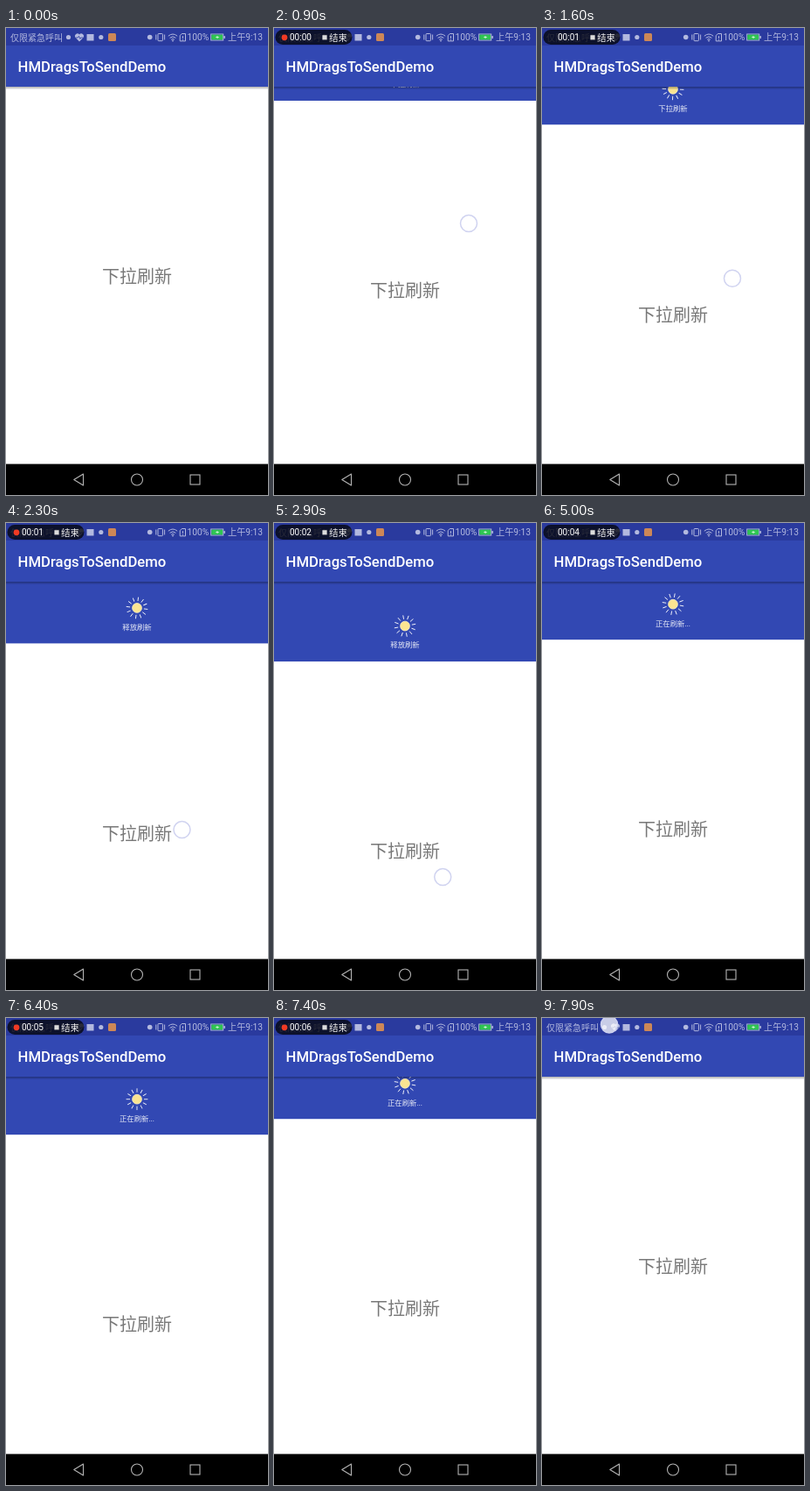
These frames come from a looping animation (300x533 px, 8 s). An HTML page:

```html
<!DOCTYPE html>
<html lang="zh">
<head>
<meta charset="utf-8">
<title>Pull to refresh</title>
<style>
  html, body { margin: 0; width: 100%; height: 100%; overflow: hidden; background: #fff; }
  svg { display: block; width: 100vw; height: 100vh; }
  text { font-family: Roboto, "Noto Sans CJK SC", "Noto Sans CJK", sans-serif; }
  .mid { text-anchor: middle; }
  .line { fill: none; stroke: #b3b9df; stroke-width: 1; }
</style>
</head>
<body>
<svg viewBox="0 0 300 533" preserveAspectRatio="none">
  <defs>
    <linearGradient id="shade" x1="0" y1="0" x2="0" y2="1">
      <stop offset="0" stop-color="#000" stop-opacity=".32"/>
      <stop offset="1" stop-color="#000" stop-opacity="0"/>
    </linearGradient>
  </defs>

  <g id="page">
    <rect y="-60" width="300" height="127" fill="#3248b3"/>
    <rect y="67" width="300" height="470" fill="#fff"/>
    <g transform="translate(150 26.3)">
      <g id="rays" stroke="#f4f5fb" stroke-width=".9" stroke-linecap="round"></g>
      <circle r="5.4" fill="#fbe491" stroke="#fbf0c4" stroke-width=".8"/>
    </g>
    <text id="label" class="mid" x="150" y="51.2" font-size="8.35" fill="#e6e9f6"></text>
    <text class="mid" x="150" y="291" font-size="20" fill="#787878">下拉刷新</text>
  </g>

  <rect y="67" width="300" height="3.5" fill="url(#shade)"/>
  <rect y="20" width="300" height="47" fill="#3248b3"/>
  <rect width="300" height="20" fill="#2a3a9e"/>
  <text x="13.6" y="50" font-size="16.7" font-weight="500" fill="#fff">HMDragsToSendDemo</text>

  <!-- status bar -->
  <g fill="#b3b9df">
    <text x="5" y="14.8" font-size="10">仅限紧急呼叫</text>
    <circle cx="71.5" cy="10.5" r="2.6"/>
    <path d="M84 15.5L79.6 11A2.6 2.6 0 0 1 84 7.6A2.6 2.6 0 0 1 88.4 11Z"/>
    <path d="M80 11h2.3l1.2-1.7 1.4 3 1-1.3h2.1" fill="none" stroke="#2a3a9e" stroke-width=".8"/>
    <rect x="92.5" y="7" width="8" height="7.5"/>
    <circle cx="108.8" cy="10.5" r="2.6"/>
    <rect x="117" y="6" width="9" height="9" rx="1.5" fill="#cd8757"/>
    <circle cx="164.7" cy="10.5" r="2.8"/>
    <rect class="line" x="174" y="6.5" width="5.4" height="8.2" rx=".8"/>
    <path class="line" d="M171.8 7.5v6M181.6 7.5v6"/>
    <path class="line" d="M185.8 9.2Q191 4.8 196.2 9.2M187.6 11.3Q191 8.5 194.4 11.3M189.2 13.2Q191 11.8 192.8 13.2"/>
    <circle cx="191" cy="14.6" r=".9"/>
    <path class="line" d="M201.3 6.5h4.2v8.4h-6.3v-6.2zM202.4 9v3M202.4 13v1"/>
    <text x="207.4" y="13.9" font-size="10.3">100%</text>
    <rect class="line" x="234.7" y="7" width="14" height="7"/>
    <rect x="235.3" y="7.6" width="12.8" height="5.8" fill="#2fc552"/>
    <path d="M239.6 10.8l2.8-1.7v1.1h2l-2.8 1.9v-1.3z" fill="#e9fbee"/>
    <rect x="249.3" y="9" width="1.6" height="3"/>
    <text x="254" y="14.4" font-size="10.2">上午9:13</text>
  </g>

  <!-- recorder pill -->
  <g id="pill">
    <rect x="1.5" y="2" width="88" height="17" rx="8.5" fill="#05070f" fill-opacity=".8"/>
    <circle id="dot" cx="12" cy="10.8" r="3.4" fill="#f03a24"/>
    <text id="clock" x="18" y="14.4" font-size="10" fill="#fff"></text>
    <rect x="55.4" y="8.2" width="5.2" height="5.2" fill="#dcdcdc"/>
    <text x="63.3" y="14.7" font-size="10.2" fill="#f2f2f2">结束</text>
  </g>

  <rect y="497.6" width="300" height="35.4" fill="#000"/>
  <g fill="none" stroke="#b4b4b4" stroke-width="1.1">
    <path d="M88.5 509v13L77.8 515.5z" stroke-linejoin="round"/>
    <circle cx="150" cy="515.5" r="6.5"/>
    <rect x="211" y="510" width="11" height="11"/>
  </g>

  <circle id="touch" r="9.5" fill="#fff" stroke="#d0d3f0" stroke-width="1.5"/>
</svg>
<script>
const LOOP = 8000, REST = 66.4;
const RELEASE = 3800, SETTLED = 4150, CLOSE = 7350, CLOSED = 7700;
const $ = id => document.getElementById(id);
const [page, rays, label, pill, dot, clock, touch] =
  ['page', 'rays', 'label', 'pill', 'dot', 'clock', 'touch'].map($);

for (let i = 0; i < 12; i++) {
  const ray = document.createElementNS('http://www.w3.org/2000/svg', 'path');
  ray.setAttribute('d', 'M0 -8.3V-12');
  ray.setAttribute('transform', `rotate(${i * 30})`);
  rays.append(ray);
}

// time, pull distance, finger x, finger y
const drag = [
  [300, 0, 226, 178],
  [500, 0, 225, 186],
  [900, 16, 223, 223],
  [1600, 43.5, 218, 285.7],
  [1800, 50.5, 213, 303],
  [2300, 70.6, 201.5, 350],
  [2700, 86.5, 195, 391],
  [3100, 96, 191.5, 417],
  [3500, 99, 190.5, 425],
  [RELEASE, 99, 190.5, 425]
];

function sample(t, col) {
  if (t <= drag[0][0]) return drag[0][col];
  const i = drag.findIndex(row => row[0] >= t);
  if (i < 0) return drag[drag.length - 1][col];
  const a = drag[i - 1], b = drag[i];
  return a[col] + (b[col] - a[col]) * (t - a[0]) / (b[0] - a[0]);
}

function ease(t, from, to) {
  const p = Math.min(1, Math.max(0, (t - from) / (to - from)));
  return 1 - (1 - p) ** 2;
}

function pull(t) {
  if (t < RELEASE) return sample(t, 1);
  if (t < CLOSE) return 99 + (REST - 99) * ease(t, RELEASE, SETTLED);
  return REST * (1 - ease(t, CLOSE, CLOSED));
}

const show = (el, on) => el.setAttribute('visibility', on ? 'visible' : 'hidden');

function draw(t) {
  const y = pull(t);
  page.setAttribute('transform', `translate(0 ${y.toFixed(2)})`);

  const angle = t < SETTLED ? y * 3.5 : (t - 6400) * 0.1;
  rays.setAttribute('transform', `rotate(${angle.toFixed(1)})`);
  label.textContent = t >= SETTLED ? '正在刷新...' : y >= REST ? '释放刷新' : '下拉刷新';

  const sec = Math.max(0, (t - 200) / 1100);
  const recording = t >= 100 && t < 7800;
  clock.textContent = '00:0' + Math.floor(sec);
  show(dot, recording && sec % 1 >= 0.5);
  show(pill, recording);

  const dragging = t >= 300 && t < RELEASE, tap = t >= 7700;
  show(touch, dragging || tap);
  touch.setAttribute('cx', tap ? 77 : sample(t, 2));
  touch.setAttribute('cy', tap ? 7.5 : sample(t, 3));
  touch.setAttribute('fill-opacity', tap ? 0.75 : 0.6);
}

const start = performance.now();
function tick(now) {
  draw(Math.max(0, now - start) % LOOP);
  requestAnimationFrame(tick);
}
draw(0);
requestAnimationFrame(tick);
</script>
</body>
</html>
```
